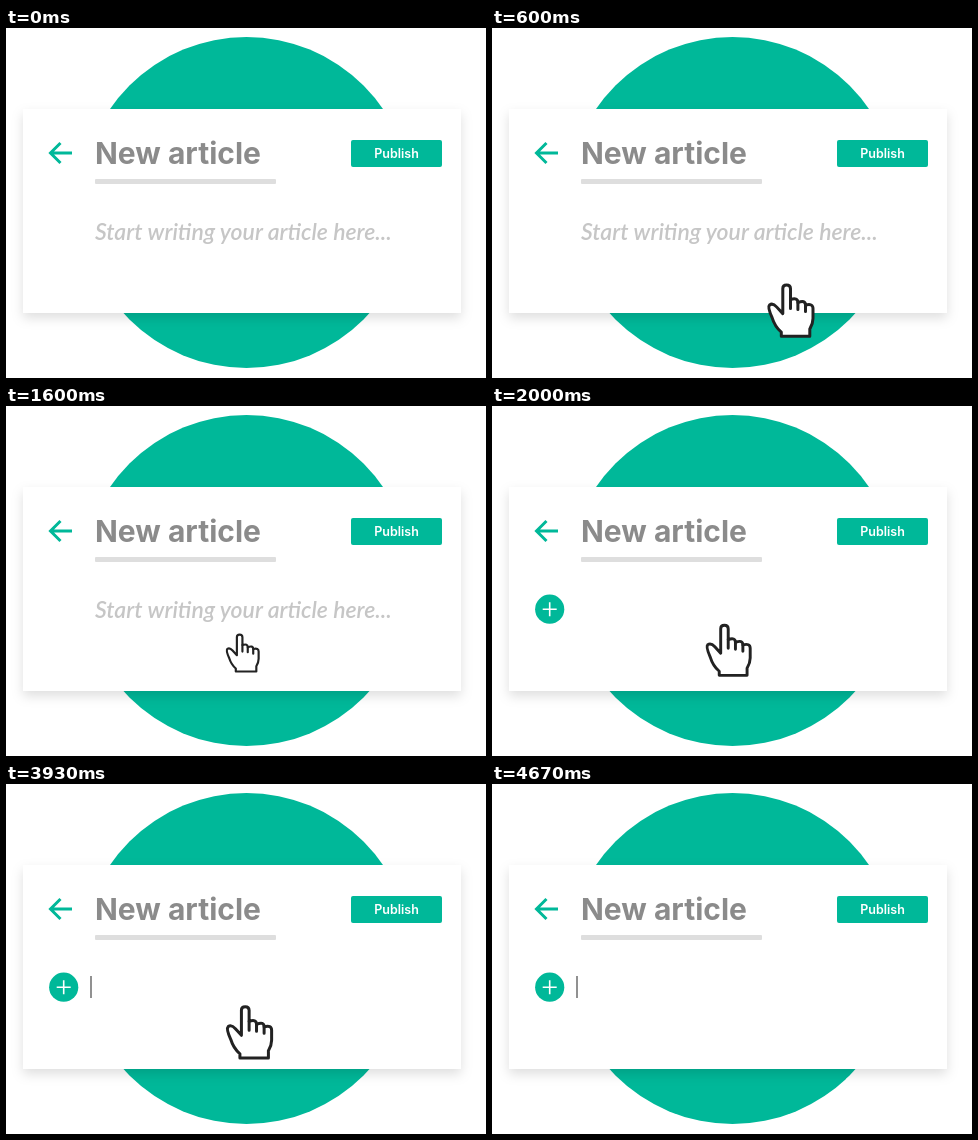
Recreate the animation shown at these times as an HTML page. Size 480x350 px, loop 4940 ms.

```html
<!DOCTYPE html>
<html lang="en">
<head>
<meta charset="utf-8">
<title>New article</title>
<style>
html, body { margin: 0; width: 100%; height: 100%; overflow: hidden; background: #fff; }
svg { display: block; }
text { font-family: Inter, sans-serif; }
.line { fill: none; stroke-linecap: round; stroke-linejoin: round; }
#card { filter: drop-shadow(0 5px 6px rgba(0, 0, 0, .13)); }
</style>
</head>
<body>
<svg width="480" height="350" viewBox="0 0 480 350">
  <circle cx="240.5" cy="174.5" r="165.5" fill="#00b899"/>
  <rect id="card" x="17" y="81" width="438" height="204" fill="#fff"/>
  <path d="M66 125H45M54.5 115L44.5 125L54.5 135" class="line" style="stroke-linecap:butt;stroke-linejoin:miter" stroke="#00b899" stroke-width="3"/>
  <text x="89" y="136" font-size="30" font-weight="700" fill="#8b8b8b">New article</text>
  <rect x="89" y="151" width="181" height="5" rx="1" fill="#dedede"/>
  <rect x="345" y="112" width="91" height="27" rx="2" fill="#00b899"/>
  <text x="390.5" y="130" font-size="12.5" font-weight="600" fill="#fff" text-anchor="middle">Publish</text>
  <text id="hint" x="89" y="211.5" font-size="23" font-weight="600" font-style="italic" fill="#c6c6c6" style="font-family:Lato,sans-serif">Start writing your article here...</text>
  <g id="plus">
    <circle cx="57.7" cy="203.2" r="14.6" fill="#00b899"/>
    <path d="M50.7 203.2H64.7M57.7 196.2V210.2" stroke="#fff" stroke-width="1.6"/>
  </g>
  <rect id="caret" x="84.2" y="192" width="1.6" height="22" fill="#777"/>
  <g id="hand" class="line" stroke="#222" stroke-width="3">
    <path fill="#fff" d="M228.5 247V222Q228.5 218.5 232.3 218.5T236.2 222V233Q243.6 230.5 243.6 236Q251.2 233 251.2 238.5Q258.7 236.5 258.7 242V252Q258.7 257 255.5 262.5V269.7H227V265.5Q220.5 260 217.8 251Q213 240.5 215.3 238.3Q218.5 236 222.5 240.5Z"/>
    <path d="M236.2 233V242M243.6 236V243M251.2 238.5V245"/>
  </g>
</svg>
<script>
const LOOP = 4940, REACH = 138;
const [hint, plus, caret, hand] = ["hint", "plus", "caret", "hand"].map(id => document.getElementById(id));

const ramp = (t, a, b) => Math.min(1, Math.max(0, (t - a) / (b - a)));
const smooth = u => u * u * (3 - 2 * u);

// Horizontal distance from the resting place, cubic at both ends
function offset(t) {
  const away = t < 2400 ? Math.max(0, 937 - t) / 438 : Math.max(0, t - 3733) / 537;
  return REACH * away ** 3;
}

function caretAlpha(t) {
  if (t < 2730) return ramp(t, 2340, 2530);
  return t >= 3400 && t < 4030 || t >= 4665 ? 1 : 0;
}

function draw(now) {
  const t = now % LOOP, dx = offset(t);
  const press = smooth(ramp(t, 1220, 1600)) - smooth(ramp(t, 1680, 2070));
  const scale = 1 - 0.28 * press;
  hand.setAttribute("transform",
    `translate(${237 + dx} ${244 + dx * 0.62 + 3 * press}) scale(${scale}) translate(-237 -244)`);
  hint.setAttribute("opacity", 1 - ramp(t, 1750, 1930));
  plus.setAttribute("opacity", ramp(t, 1750, 1930));
  caret.setAttribute("opacity", caretAlpha(t));
}

function tick() {
  draw(performance.now());
  requestAnimationFrame(tick);
}
tick();
</script>
</body>
</html>
```
